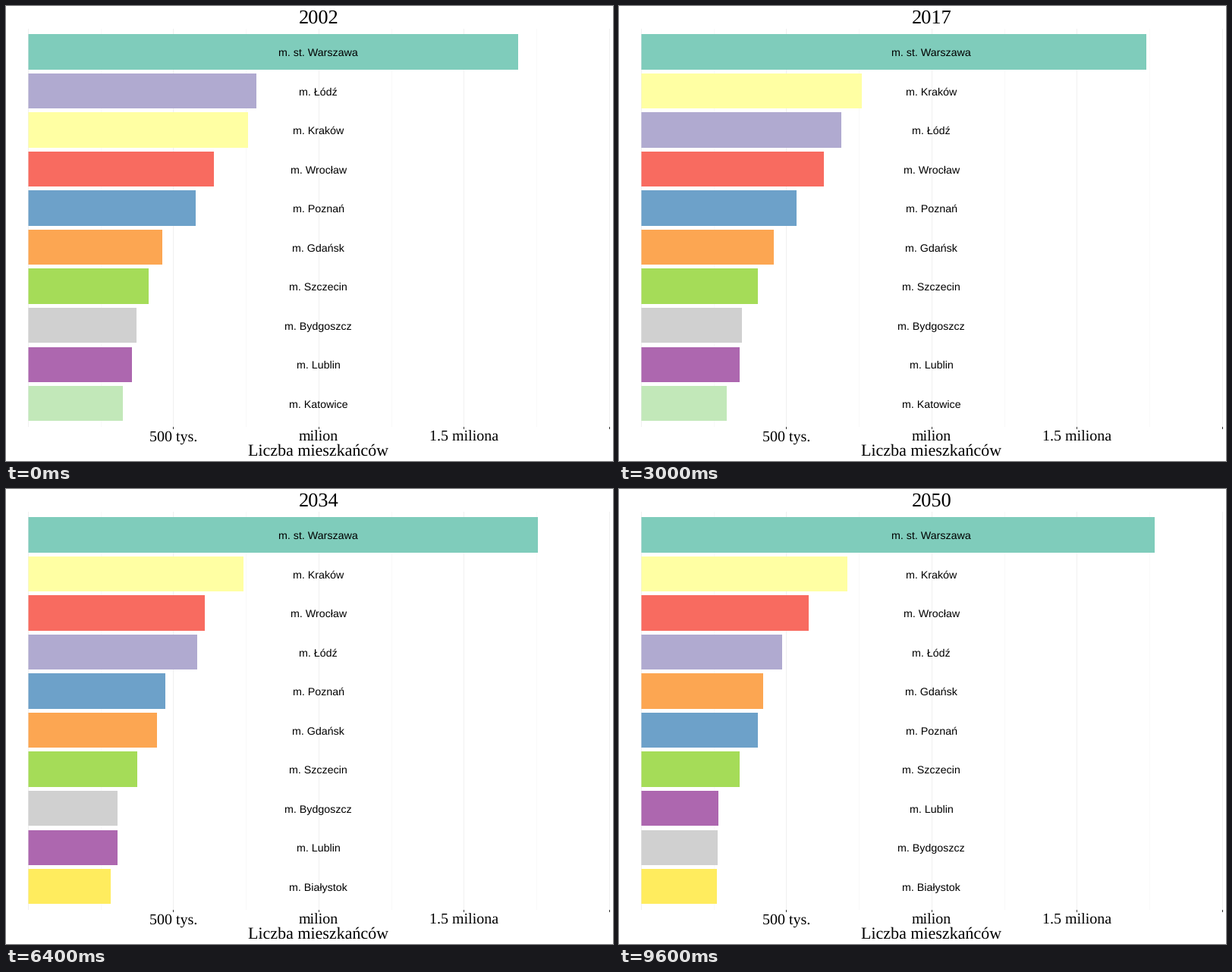
Write a matplotlib script that moves like this. It is 800x600 px and loops after 9.8 s.

```python
import numpy as np
import matplotlib.pyplot as plt
from matplotlib.animation import FuncAnimation
from matplotlib.patches import Rectangle

W, H, DPI = 800, 600, 100
FIRST_YEAR, N_YEARS = 2002, 49
GRID_LEFT, HALF_GRID = 29.3, 95.75
BAR_LEFT, ROW_TOP, ROW_STEP, BAR_H = 29.5, 37.12, 51.55, 46.4
MID = 411.8
ROWS = 10

# Colour, then bar ends (px) at evenly spaced times that a smooth curve joins
CITIES = {
    "m. st. Warszawa": ("#7fccbb", 675, 691, 700.8, 700, 706),
    "m. Łódź": ("#b0aad0", 330.3, 271, 215),
    "m. Kraków": ("#ffffa3", 319.4, 317.3, 301),
    "m. Wrocław": ("#f86b60", 274, 266, 250),
    "m. Poznań": ("#6da1c9", 250, 222, 183),
    "m. Gdańsk": ("#fca652", 206, 202, 190),
    "m. Szczecin": ("#a5dc58", 188, 178, 159),
    "m. Bydgoszcz": ("#d0d0d0", 172, 154.5, 130),
    "m. Lublin": ("#ad67af", 166, 152.9, 131),
    "m. Katowice": ("#c2e8b9", 154, 135, 120),
    "m. Białystok": ("#ffec5e", 140, 140, 129),
}


def curve(points):
    """Polynomial through points spread evenly over 0..1."""
    return np.poly1d(np.polyfit(np.linspace(0, 1, len(points)), points,
                                len(points) - 1))


COLORS = {city: spec[0] for city, spec in CITIES.items()}
CURVES = {city: curve(spec[1:]) for city, spec in CITIES.items()}

plt.rcParams["text.hinting"] = "none"
fig = plt.figure(figsize=(W / DPI, H / DPI), dpi=DPI, facecolor="white")
ax = fig.add_axes([0, 0, 1, 1])
ax.set_xlim(0, W)
ax.set_ylim(H, 0)
ax.axis("off")


def box(x, y, w, h, color, z=1):
    return ax.add_patch(Rectangle((x, y), w, h, fc=color, lw=0, zorder=z,
                                  snap=False))


def label(x, y, s, px, font="Liberation Serif"):
    return ax.text(x, y, s, fontsize=px * 72 / DPI, family=font, color="black",
                   ha="center", va="baseline", zorder=5)


# Grid, ticks and axis texts
for i in range(9):
    x = int(GRID_LEFT + i * HALF_GRID)
    major = i % 2 == 0
    box(x, 30, 1, 525, "#f0f0f0" if major else "#f9f9f9")
    if major and i:
        box(x, 555, 1, 3, "#333333")
for i, s in enumerate(["500 tys.", "milion", "1.5 miliona"], 1):
    label(MID + (i - 2) * 2 * HALF_GRID, 574, s, 20)
label(MID, 593, "Liczba mieszkańców", 22)
title = label(MID, 23, "", 26.4)

bars, names = [], []
for row in range(ROWS):
    top = ROW_TOP + row * ROW_STEP
    y0, y1 = round(top), round(top + BAR_H)
    bars.append(box(BAR_LEFT, y0, 1, y1 - y0, "white", 3))
    names.append(label(MID, round(top + BAR_H / 2 + 5.7), "", 14.2,
                       "Liberation Sans"))


def update(i):
    t = i / (N_YEARS - 1)
    ends = {city: f(t) for city, f in CURVES.items()}
    ranked = sorted(ends, key=ends.get, reverse=True)
    for city, bar, name in zip(ranked, bars, names):
        bar.set_width(round(ends[city]) - BAR_LEFT)
        bar.set_facecolor(COLORS[city])
        name.set_text(city)
    title.set_text(str(FIRST_YEAR + i))
    return [title, *bars, *names]


anim = FuncAnimation(fig, update, frames=N_YEARS, interval=200,
                     repeat=True, repeat_delay=0, blit=False)
plt.show()
```
